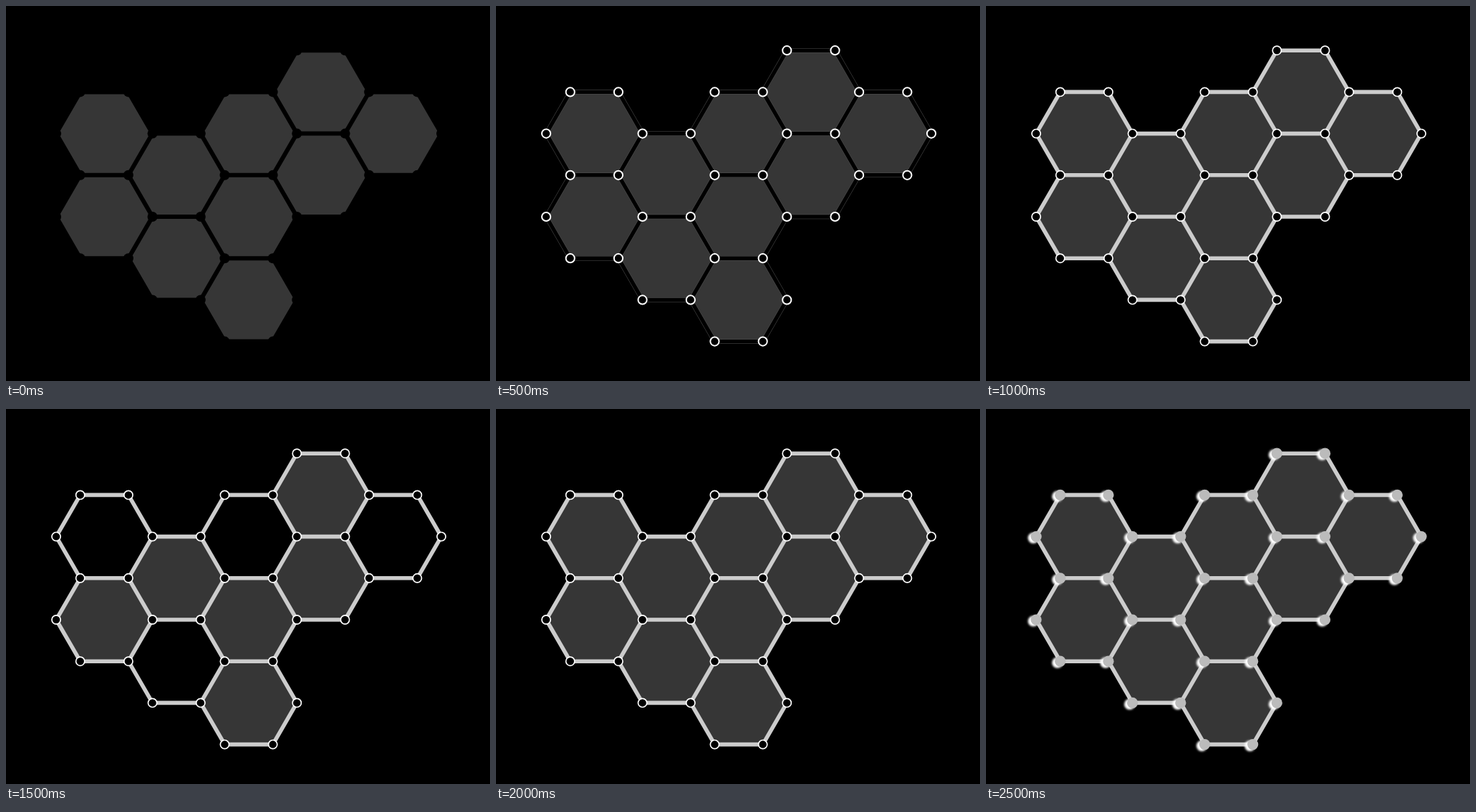
Write an HTML page with a canvas that moves like this. It is 676 px wide and 525 px high and loops after 3 s.

```html
<!DOCTYPE html>
<html lang="en">
<head>
<meta charset="utf-8">
<style>
  html, body { margin: 0; height: 100%; overflow: hidden; background: #000; }
  canvas { display: block; }
</style>
</head>
<body>
<canvas id="stage" width="676" height="525"></canvas>
<script>
const ctx = document.getElementById('stage').getContext('2d');
const STEP_X = 33.62, STEP_Y = 58.2, STEP_MS = 500;

// Cells as [column, half-row, blinks off]
const cells = [
  [0, 2, true], [0, 4], [1, 3], [1, 5, true], [2, 2, true],
  [2, 4], [2, 6], [3, 1], [3, 3], [4, 2, true],
];
const corners = [[-2, 0], [-1, -1], [1, -1], [2, 0], [1, 1], [-1, 1]];

const nodes = new Map();
const edges = new Map();
for (const cell of cells) {
  const [col, row] = cell;
  cell.points = corners.map(([dx, dy]) => {
    const u = col * 3 + 2 + dx, v = row + dy, key = u + ',' + v;
    if (!nodes.has(key)) nodes.set(key, { key, x: 70.1 + u * STEP_X, y: 62.2 + v * STEP_Y });
    return nodes.get(key);
  });
  cell.points.forEach((a, i) => {
    const b = cell.points[(i + 1) % 6];
    edges.set([a.key, b.key].sort().join(' '), [a, b]);
  });
}

function drawCells(blink) {
  ctx.fillStyle = '#363636';
  for (const cell of cells) {
    if (blink && cell[2]) continue;
    ctx.beginPath();
    for (const p of cell.points) ctx.lineTo(p.x, p.y);
    ctx.fill();
  }
}

function drawEdges(color, width) {
  ctx.strokeStyle = color;
  ctx.lineWidth = width;
  ctx.beginPath();
  for (const [a, b] of edges.values()) {
    ctx.moveTo(a.x, a.y);
    ctx.lineTo(b.x, b.y);
  }
  ctx.stroke();
}

function drawNodes(radius, fill, ring) {
  ctx.fillStyle = fill;
  ctx.strokeStyle = '#fff';
  ctx.lineWidth = ring;
  for (const { x, y } of nodes.values()) {
    ctx.beginPath();
    ctx.arc(x, y, radius, 0, Math.PI * 2);
    ctx.fill();
    if (ring) ctx.stroke();
  }
}

function draw(step) {
  ctx.clearRect(0, 0, 676, 525);
  drawCells(step === 3);
  if (step === 0) {
    drawEdges('#000', 6);
    drawNodes(7, '#000', 0);
  } else if (step === 1) {
    drawEdges('#505050', 6.4);
    drawEdges('#000', 5.4);
    drawNodes(6.1, '#000', 2);
  } else {
    drawEdges('#ccc', 5.6);
    if (step < 5) {
      drawNodes(6.1, '#000', 1.7);
    } else {
      ctx.save();
      ctx.shadowColor = '#fff';
      ctx.shadowBlur = 3;
      ctx.shadowOffsetX = -4;
      ctx.shadowOffsetY = 2;
      drawNodes(7.6, '#bbb', 0);
      ctx.restore();
    }
  }
}

const start = performance.now();
function tick() {
  draw(Math.floor((performance.now() - start) / STEP_MS) % 6);
  requestAnimationFrame(tick);
}
tick();
</script>
</body>
</html>
```
